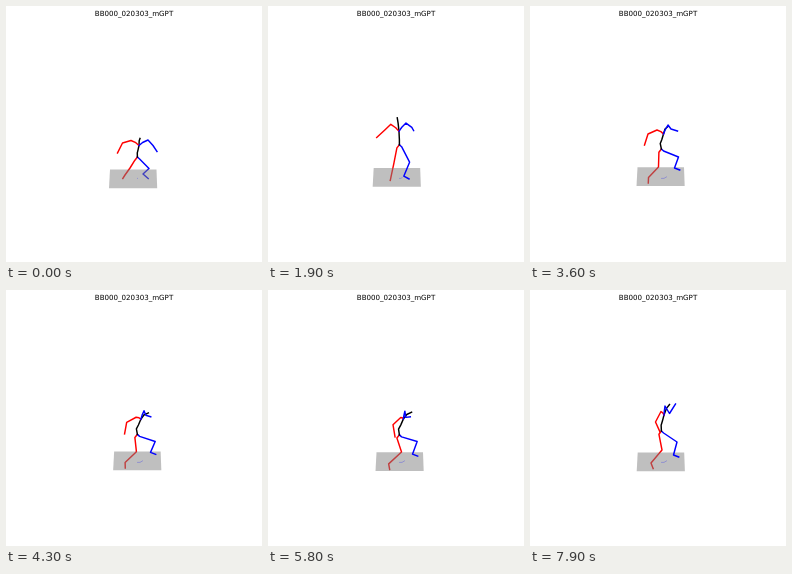
Animation, 256 px wide and 256 px high, one loop 8000 ms. Source, as an HTML page with a canvas:

```html
<!DOCTYPE html>
<html lang="en">
<head>
<meta charset="utf-8">
<title>Skeleton motion</title>
<style>
html, body { margin: 0; width: 100%; height: 100%; overflow: hidden; background: #fff; }
canvas, svg { position: absolute; left: 0; top: 0; width: 256px; height: 256px; }
text { font: 7.1px "DejaVu Sans", sans-serif; text-anchor: middle; }
</style>
</head>
<body>
<canvas id="stage"></canvas>
<svg viewBox="0 0 256 256"><text x="128" y="10.4">BB000_020303_mGPT</text></svg>
<script>
const LOOP = 8000, STEP = 100;
const TIMES = [0, 1000, 2700, 3600, 5000, 6600, 7900];
const canvas = document.getElementById("stage");
const ctx = canvas.getContext("2d");
const scale = window.devicePixelRatio || 1;
canvas.width = canvas.height = 256 * scale;

// Monotone cubic curve through one value per key time
function curve(...v) {
  const last = TIMES.length - 1;
  const rate = i => (v[i + 1] - v[i]) / (TIMES[i + 1] - TIMES[i]);
  const slope = v.map((_, i) => {
    if (i === 0 || i === last) return 0;
    const a = rate(i - 1), b = rate(i);
    return a * b > 0 ? 2 * a * b / (a + b) : 0;
  });
  return t => {
    let i = 0;
    while (i < last - 1 && t > TIMES[i + 1]) i++;
    const h = TIMES[i + 1] - TIMES[i];
    const s = Math.min(1, (t - TIMES[i]) / h);
    const e = s * s * (3 - 2 * s);
    return v[i] + (v[i + 1] - v[i]) * e
      + h * s * (1 - s) * (slope[i] * (1 - s) - slope[i + 1] * s);
  };
}

function joint(xs, ys) {
  const x = curve(...xs), y = curve(...ys);
  return t => [x(t), y(t)];
}

const floorAt = joint([104, 104.7, 106.6, 107.5, 108.5, 108.5, 107.7], [163.5, 162, 162, 161.2, 162, 162.5, 162.5]);
const pelvisY = curve(151, 138, 140, 143, 145, 144.5, 141);
const chestAt = joint([133, 132, 130.5, 133.5, 135.5, 135, 134], [139.5, 125, 126, 128, 130, 127.5, 125]);
const headAt = joint([134, 130, 129, 138, 144.5, 142, 139.5], [132.5, 111, 113.5, 120.5, 124, 119, 114.5]);
const spineBend = curve(-0.7, 0.2, 0, -1.9, -2.4, -2, -1.2);

const red = {
  knee: joint([124, 124, 128, 128.5, 132.5, 134, 132], [162, 154, 160, 161, 162, 162, 160]),
  ankle: joint([119, 122, 124, 118.5, 120, 121, 121], [169, 167, 171, 171.5, 173.5, 174, 173]),
  shoulder: joint([125, 125, 121, 127, 132, 133, 131], [134.5, 118, 119, 124, 129, 125, 121.5]),
  elbow: joint([116.5, 119, 115, 118, 123, 126, 125.5], [137, 124, 124, 128, 135, 134, 132]),
  wrist: joint([111.5, 112.5, 105.5, 114.5, 122, 130, 130], [147, 130, 134, 139, 147, 147, 142])
};

const blue = {
  knee: joint([143, 138, 146, 148.5, 149.5, 148.5, 147], [162.5, 157.5, 155, 151, 152, 151, 152]),
  ankle: joint([137, 135.5, 136.5, 144.5, 144.5, 144.5, 143.5], [168, 172.5, 166.5, 162, 163, 165, 165]),
  shoulder: joint([142, 140, 137, 138, 138, 135.5, 135], [134, 116.5, 118, 119, 122, 119.5, 116]),
  elbow: joint([147, 143, 144.5, 141, 139, 137, 139.5], [139.5, 119.5, 123, 123, 127.5, 127, 123.5]),
  wrist: joint([151, 146, 145.5, 147.5, 142, 143, 145.5], [145.5, 123, 126, 125, 128.5, 123.5, 114])
};

const mix = (a, b, k) => [a[0] + (b[0] - a[0]) * k, a[1] + (b[1] - a[1]) * k];
const shift = (p, x, y) => [p[0] + x, p[1] + y];

function line(color, points, width = 1.45) {
  ctx.strokeStyle = color;
  ctx.lineWidth = width;
  ctx.beginPath();
  points.forEach(p => ctx.lineTo(...p));
  ctx.stroke();
}

function drawFloor(t) {
  const [x, y] = floorAt(t);
  ctx.fillStyle = "rgba(128,128,128,.5)";
  ctx.beginPath();
  ctx.moveTo(x, y);
  ctx.lineTo(x + 46.5, y);
  ctx.lineTo(x + 47.2, y + 18.7);
  ctx.lineTo(x - 1, y + 18.7);
  ctx.fill();
}

function drawTrail(t) {
  const grow = Math.min(1, t / 3600);
  const start = [131.5, 172.4];
  line("rgba(80,80,225,.6)", [start, shift(start, 2.5 * grow, 0), shift(start, 5 * grow, -1.5 * grow)], 0.7);
}

function arm(color, limb, chest, t) {
  const shoulder = limb.shoulder(t);
  const collar = shift(mix(chest, shoulder, 0.4), 0, -0.8);
  line(color, [chest, collar, shoulder, limb.elbow(t), limb.wrist(t)]);
}

function draw(t) {
  ctx.setTransform(scale, 0, 0, scale, 0, 0);
  ctx.clearRect(0, 0, 256, 256);
  ctx.lineJoin = "round";
  ctx.lineCap = "square";

  const pelvis = [131.4, pelvisY(t)];
  const chest = chestAt(t), head = headAt(t);
  const bend = spineBend(t);

  const redAnkle = red.ankle(t);
  const redToe = shift(redAnkle, -2.2 + 4.4 * t / LOOP, 3.5 + 2 * Math.min(1, t / 1000));
  line("#f00", [pelvis, shift(pelvis, -2.5, 3.2), red.knee(t), redAnkle, redToe]);

  // The foot reaches forward once while stepping
  const reach = t > 2800 && t < 3600 ? Math.sin(Math.PI * (t - 2800) / 800) ** 2 : 0;
  const blueAnkle = shift(blue.ankle(t), 9 * reach, 0);
  const blueToe = shift(blueAnkle, 5.2, 2 + 2.5 * Math.max(0, 1 - t / 2700));
  const blueLeg = [pelvis, shift(pelvis, 2.2, 2), blue.knee(t), blueAnkle, blueToe];

  const below = t < 1900;
  if (below) line("#00f", blueLeg);
  drawFloor(t);
  drawTrail(t);
  if (!below) line("#00f", blueLeg);

  line("#000", [
    pelvis,
    shift(mix(pelvis, chest, 0.36), bend, 0),
    shift(mix(pelvis, chest, 0.62), bend * 0.5, 0),
    chest,
    shift(mix(chest, head, 0.55), bend * 0.5, -0.8),
    head
  ]);
  arm("#f00", red, chest, t);
  arm("#00f", blue, chest, t);
}

const begin = performance.now();
function tick() {
  const t = (performance.now() - begin) % LOOP;
  draw(Math.floor(t / STEP) * STEP);
  requestAnimationFrame(tick);
}
tick();
</script>
</body>
</html>
```
